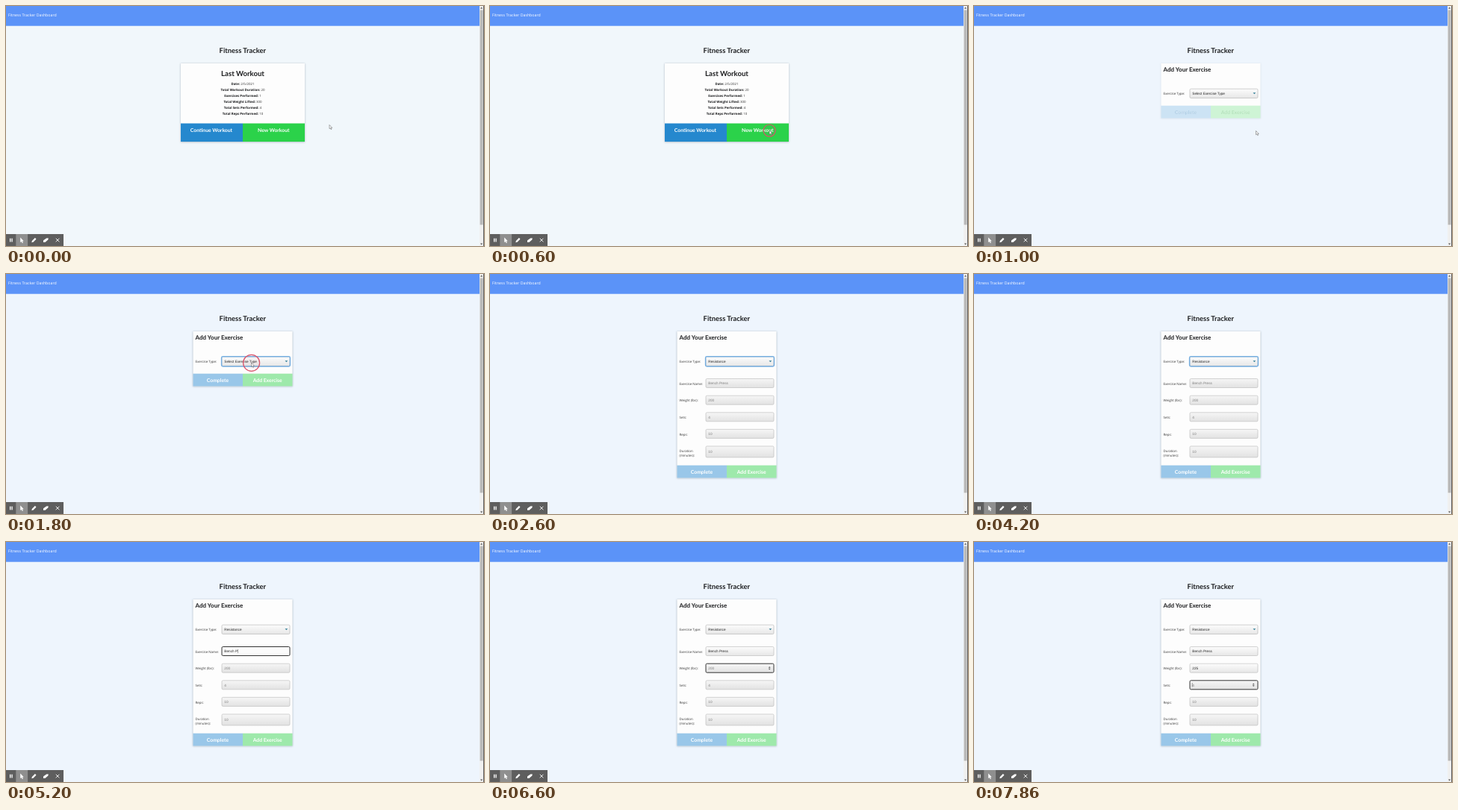
An HTML page for the animation above (8 s loop, 640 by 322 pixels).

```html
<!DOCTYPE html>
<html lang="en">
<head>
<meta charset="utf-8">
<title>Fitness Tracker</title>
<style>
  html, body { margin: 0; width: 100%; height: 100%; overflow: hidden; }
  svg { display: block; width: 100vw; height: 100vh; }
  text { white-space: pre; text-rendering: geometricPrecision; }
  .head { font-family: Lato, sans-serif; font-weight: 700; fill: #1c1d1f; }
  .body { font: 4.4px "Open Sans", sans-serif; fill: #333; }
  .body .b { font-weight: 700; fill: #1c1d1f; }
  .field { font: 4.7px "Liberation Sans", Arial, sans-serif; }
  .mid { text-anchor: middle; }
  .btn { font: 700 6.8px Lato, sans-serif; text-anchor: middle; }
</style>
</head>
<body>
<svg id="stage" viewBox="0 0 640 322" xmlns="http://www.w3.org/2000/svg">
  <defs>
    <linearGradient id="empty" x2="0" y2="1">
      <stop stop-color="#f6f6f6"/><stop offset="1" stop-color="#e2e2e2"/>
    </linearGradient>
    <linearGradient id="filled" x2="0" y2="1">
      <stop stop-color="#fcfcfc"/><stop offset="1" stop-color="#e7e7e7"/>
    </linearGradient>
    <filter id="soft" x="-10%" y="-10%" width="120%" height="120%">
      <feGaussianBlur stdDeviation="1"/>
    </filter>
  </defs>

  <rect id="page" width="640" height="322"/>
  <rect width="634" height="26.7" fill="#5b93f8"/>
  <text x="3" y="14" class="body" style="font-size:5.25px;fill:#fff">Fitness Tracker Dashboard</text>
  <text x="316.8" y="62.5" class="head mid" font-size="9.4">Fitness Tracker</text>

  <g id="dash">
    <rect x="233.7" y="77" width="166.6" height="106" rx="1" fill="#8290a0" opacity=".5" filter="url(#soft)"/>
    <rect x="234" y="77" width="166" height="105" fill="#fdfdfd"/>
    <text x="317" y="94.3" class="head mid" font-size="9.6">Last Workout</text>
    <g id="stats"></g>
    <rect x="234" y="157.5" width="83" height="24.5" fill="#2588ce"/>
    <rect x="317" y="157.5" width="83" height="24.5" fill="#2bd24a"/>
    <text x="275" y="168.9" class="btn" fill="#fff">Continue Workout</text>
    <text x="358.3" y="168.9" class="btn" fill="#fff">New Workout</text>
  </g>

  <g id="form">
    <rect id="shade" x="250" y="77" width="134" rx="1" fill="#8290a0" filter="url(#soft)"/>
    <rect id="card" x="250.5" y="77" width="133" fill="#fdfdfd"/>
    <text x="253.6" y="87.9" class="head" font-size="8">Add Your Exercise</text>
    <text x="253.6" y="119.2" class="body">Exercise Type:</text>
    <rect id="glow" x="288.5" y="110.7" width="92" height="13.3" rx="1.8" fill="none" stroke="#7db7e9" stroke-width="1.3"/>
    <rect id="select" x="289" y="111.2" width="91" height="12.3" rx="1.5" fill="url(#filled)" stroke-width=".6"/>
    <text id="choice" x="292.3" y="118.8" class="field" fill="#222"></text>
    <path d="M373.5 116.3h3.8l-1.9 2z" fill="#2f7c96"/>
    <g id="fields"></g>
    <g id="buttons">
      <rect class="tint" x="250.5" width="66.5" height="16.8" fill="#2185d0"/>
      <rect class="tint" x="317" width="66.5" height="16.8" fill="#2ad048"/>
      <g fill="#fff">
        <text x="283.5" y="11.1" class="btn">Complete</text>
        <text x="350.2" y="11.1" class="btn">Add Exercise</text>
      </g>
      <g id="ink">
        <text x="283.5" y="11.1" class="btn" fill="#7fb0d6">Complete</text>
        <text x="350.2" y="11.1" class="btn" fill="#7fcf8c">Add Exercise</text>
      </g>
    </g>
  </g>

  <circle id="ring" fill="#d6405a" fill-opacity=".04" stroke="#d9536a" stroke-width="1.2"/>
  <path id="cursor" d="M0 0V5.2L1.3 4.2L2.2 6.2L3 5.8L2.2 3.9H3.8Z" fill="#fff" stroke="#555" stroke-width=".5"/>

  <g id="scrollbar">
    <rect x="634" width="6" height="322" fill="#f0f0f0"/>
    <rect x="634.6" y="5.5" width="4" height="288" fill="#b9b9b9"/>
    <path d="M635 3.4h3.2l-1.6-2zM635 318.4h3.2l-1.6 2z" fill="#555"/>
    <rect x="639.2" width=".8" height="322" fill="#3c3c3c"/>
  </g>

  <g id="toolbar">
    <rect y="306" width="77" height="16" fill="#5e5e5e"/>
    <rect x="13.3" y="306" width="15.8" height="16" fill="#8f8f8f"/>
    <path d="M5 311.7h1.3v4.8H5zM7.4 311.7h1.3v4.8H7.4z" fill="#fff"/>
    <path d="M19.2 310.6v6.6l1.5-1.3 1.2 2.3 1-.5-1.1-2.2h2z" fill="#fff"/>
    <path d="M34.3 317.3l.6-2.2 4-4 1.6 1.6-4 4z" fill="#fff"/>
    <path d="M50 314.6l4.2-3.2h2.6l-.4 2.2-4 3.3H50z" fill="#fff"/>
    <path d="M66.8 311.8l4.6 4.6m0-4.6l-4.6 4.6" stroke="#fff" stroke-width=".9"/>
  </g>
</svg>

<script>
const LOOP = 8000;
const PAGE_AT = 860, SELECT_AT = 1730, CHOICE_AT = 2600;
const $ = id => document.getElementById(id);
const set = (el, attrs) => { for (const k in attrs) el.setAttribute(k, attrs[k]); };
const show = (el, on) => { el.style.display = on ? '' : 'none'; };
const clamp = v => Math.min(1, Math.max(0, v));

const stats = [['Date', '2/5/2021'], ['Total Workout Duration', 20], ['Exercises Performed', 1],
  ['Total Weight Lifted', 300], ['Total Sets Performed', 4], ['Total Reps Performed', 10]];
$('stats').innerHTML = stats.map(([k, v], i) =>
  `<text x="317" y="${106.1 + i * 8}" class="body mid"><tspan class="b">${k}:</tspan> ${v}</text>`).join('');

// keys: time of each typed character; focus: [start, end]
const fields = [
  { label: ['Exercise Name:'], y: 140.5, h: 12, hint: 'Bench Press', text: 'Bench Press', focus: [4330, 5800],
    keys: [4600, 4660, 4730, 4800, 4860, 5000, 5130, 5260, 5330, 5400, 5460] },
  { label: ['Weight (lbs):'], y: 163.2, h: 12, hint: '200', text: '225', focus: [5800, 7400],
    keys: [6860, 7000, 7200], spin: true },
  { label: ['Sets:'], y: 185.8, h: 12, hint: '4', text: '', focus: [7400, LOOP], keys: [], spin: true },
  { label: ['Reps:'], y: 208.4, h: 12, hint: '10', text: '', focus: [LOOP, LOOP], keys: [] },
  { label: ['Duration', '(minutes):'], y: 231, h: 15, hint: '10', text: '', focus: [LOOP, LOOP], keys: [] }
];

$('fields').innerHTML = fields.map(({ label, y, h }) => {
  const mid = y + h / 2;
  const rows = label.map((s, i) =>
    `<text x="253.6" y="${mid + (label.length > 1 ? .6 + i * 5.8 : 2.2)}" class="body">${s}</text>`).join('');
  return `<g>${rows}<rect class="box" x="289" y="${y}" width="91" height="${h}" rx="1.5"/>
    <text x="292.3" y="${mid + 1.7}" class="field"></text>
    <rect class="caret" y="${mid - 2.8}" width=".4" height="5.4" fill="#222"/>
    <path class="spin" d="M372.8 ${mid - .5}h2.8l-1.4-1.8zM372.8 ${mid + .5}h2.8l-1.4 1.8z" fill="#555"/></g>`;
}).join('');
fields.forEach((f, i) => {
  const g = $('fields').children[i];
  for (const c of ['box', 'field', 'caret', 'spin']) f[c + 'El'] = g.querySelector('.' + c);
});

function drawField(f, t) {
  const count = f.keys.filter(k => k <= t).length;
  const focused = t >= f.focus[0] && t < f.focus[1];
  set(f.boxEl, {
    fill: focused && count ? '#fbfbfb' : `url(#${count ? 'filled' : 'empty'})`,
    stroke: focused ? '#333' : '#b8b8b8',
    'stroke-width': focused ? 1 : .6
  });
  f.fieldEl.textContent = count ? f.text.slice(0, count) : f.hint;
  set(f.fieldEl, { fill: count ? '#222' : '#7c7c7c' });
  const since = t - (count ? f.keys[count - 1] : f.focus[0]);
  const lit = focused && since % 1000 < 500;
  show(f.caretEl, lit);
  if (lit) set(f.caretEl, { x: 292.3 + (count ? f.fieldEl.getComputedTextLength() + .2 : -.4) });
  show(f.spinEl, focused && f.spin);
}

// time, x, y of the pointer tip
const path = [[0, 433, 159.5], [60, 433, 159.5], [560, 374, 167], [860, 376, 167.5], [1000, 377.5, 167.5],
  [1130, 377.5, 167.5], [1600, 328.6, 119.3], [2050, 328.6, 119.3], [2350, 322, 132], [2600, 322, 132]];

function pointer(t) {
  const i = path.findIndex(p => p[0] > t);
  const [a, b] = [path[i - 1], path[i]];
  const k = (t - a[0]) / (b[0] - a[0]);
  const e = k * k * (3 - 2 * k);
  return [a[1] + (b[1] - a[1]) * e, a[2] + (b[2] - a[2]) * e];
}

function drawPointer(t) {
  show($('cursor'), t < CHOICE_AT);
  const click = [600, SELECT_AT].find(c => t >= c && t < c + 330);
  const ringOn = click !== undefined && !(click < PAGE_AT && t >= PAGE_AT);
  show($('ring'), ringOn);
  if (t >= CHOICE_AT) return;
  const [x, y] = pointer(t);
  set($('cursor'), { transform: `translate(${x} ${y})` });
  if (!ringOn) return;
  const age = t - click;
  set($('ring'), { cx: x, cy: y, r: 8 + 3 * clamp(age / 70), opacity: 1 - clamp((age - 150) / 180) });
}

function render(t) {
  const onForm = t >= PAGE_AT, open = t >= CHOICE_AT;
  set($('page'), { fill: onForm ? '#eef5fd' : '#f1f7fb' });
  show($('dash'), !onForm);
  show($('form'), onForm);

  const fade = clamp((t - PAGE_AT) / 400);
  const top = open ? 256.7 : 133.7;
  set($('card'), { height: top - 60.2 });
  set($('shade'), { height: top - 59.5, opacity: .5 * fade });
  set($('buttons'), { transform: `translate(0 ${top})` });
  set($('ink'), { opacity: 1 - fade });
  document.querySelectorAll('.tint').forEach(el => set(el, { opacity: .1 + .35 * fade }));

  const selected = t >= SELECT_AT && t < fields[0].focus[0];
  show($('glow'), selected);
  set($('select'), { stroke: selected ? '#5c93c4' : '#b0b0b0' });
  $('choice').textContent = open ? 'Resistance' : 'Select Exercise Type';
  show($('fields'), open);
  if (open) fields.forEach(f => drawField(f, t));
  drawPointer(t);
}

const start = performance.now();
function tick() {
  render((performance.now() - start) % LOOP);
  requestAnimationFrame(tick);
}
tick();
</script>
</body>
</html>
```
